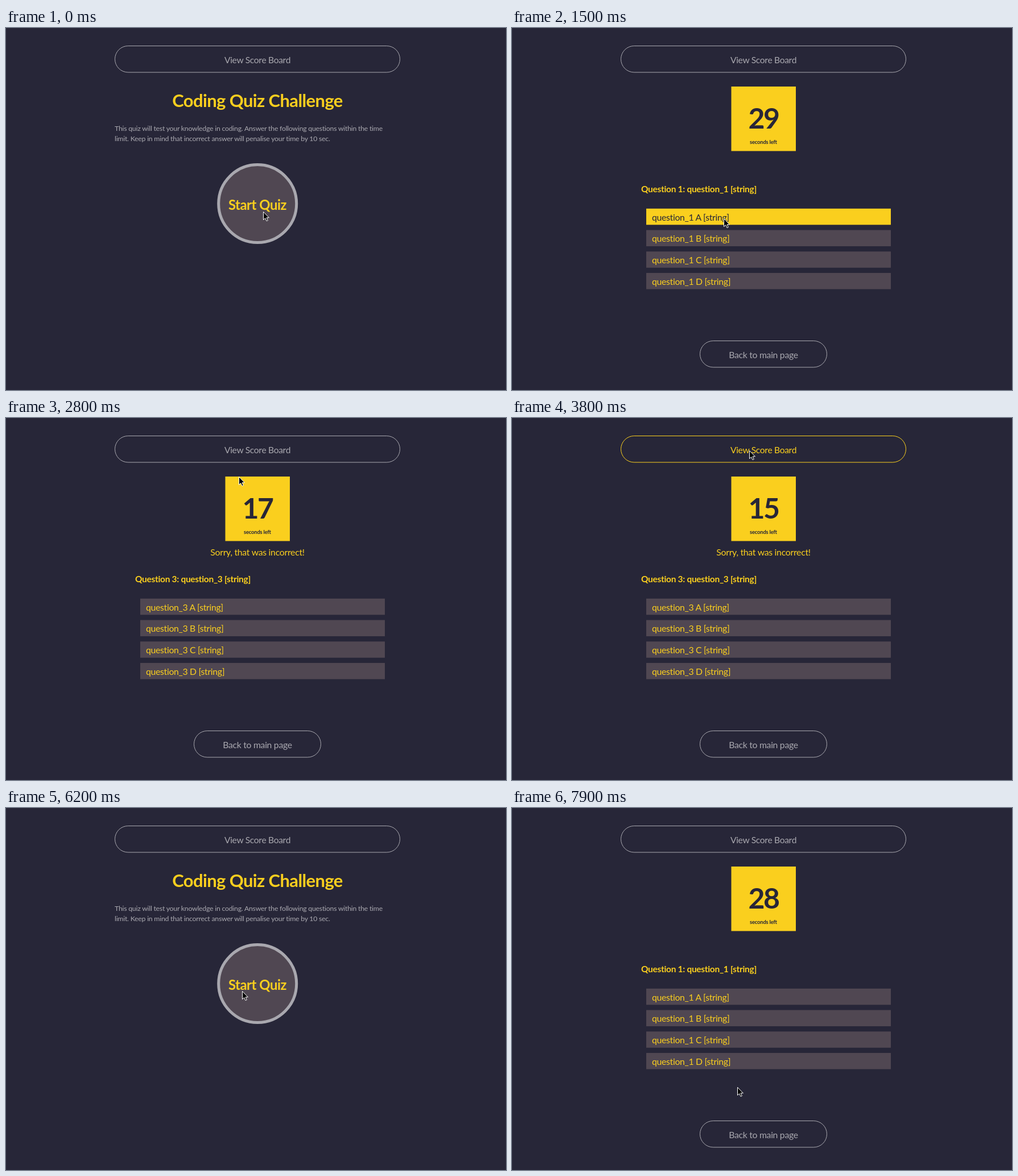
Recreate the animation shown at these times as an HTML page. Size 879 by 637 pixels, loop 8000 ms.

```html
<!DOCTYPE html>
<html lang="en">
<head>
<meta charset="utf-8">
<title>Coding Quiz Challenge</title>
<style>
html, body { margin: 0; width: 100%; height: 100%; overflow: hidden; background: #272638; }
svg { display: block; width: 879px; height: 637px; }
text { font-family: Lato, "Open Sans", sans-serif; letter-spacing: -.02em; white-space: pre; }
.clock text { letter-spacing: -.05em; }
</style>
</head>
<body>
<svg id="stage" viewBox="0 0 879 637"></svg>
<script>
const stage = document.getElementById('stage');
const LOOP = 8000, STEP = 100, TICK = 700;
const DARK = '#272638', GOLD = '#facf1e', GREY = '#a9a8af', PLUM = '#504752';
const MID = 442;

// pointer stops: time, x, y
const path = [
  [0, 452, 323], [400, 452, 323], [1300, 372, 335], [1600, 372, 335],
  [1800, 361, 377], [2200, 361, 377], [2900, 417, 57], [4100, 417, 57],
  [4700, 434, 94], [4900, 434, 94], [5400, 440, 572], [5800, 440, 572],
  [6200, 415, 322], [6300, 415, 322], [6600, 397, 490], [7500, 397, 490],
  [7700, 396, 491], [LOOP, 396, 491]
];

function pointer(t) {
  const i = Math.max(1, path.findIndex(p => p[0] >= t));
  const [t0, x0, y0] = path[i - 1], [t1, x1, y1] = path[i];
  const k = Math.max(0, (t - t0) / (t1 - t0));
  return [Math.round(x0 + (x1 - x0) * k), Math.round(y0 + (y1 - y0) * k)];
}

const rect = (x, y, w, h, fill, more = '') =>
  `<rect x="${x}" y="${y}" width="${w}" height="${h}" fill="${fill}" ${more}/>`;

const text = (s, x, y, size, fill, weight = 400, anchor = 'start') =>
  `<text x="${x}" y="${y}" font-size="${size}" fill="${fill}" font-weight="${weight}" text-anchor="${anchor}">${s}</text>`;

const centred = (s, y, size, fill, weight) => text(s, MID, y, size, fill, weight, 'middle');

const inside = ([px, py], x, y, w, h) => px >= x && px <= x + w && py >= y && py <= y + h;

function pill(label, x, y, w, size, mouse) {
  const color = inside(mouse, x, y, w, 46.5) ? GOLD : GREY;
  return rect(x, y, w, 46.5, 'none', `rx="23.25" stroke="${color}"`) +
    centred(label, y + 30.2, size, color);
}

const scoreButton = mouse => pill('View Score Board', 191.5, 31.5, 501, 15.6, mouse);
const backButton = mouse => pill('Back to main page', 330.5, 550.5, 223, 15.8, mouse);

function home(mouse) {
  return scoreButton(mouse) +
    centred('Coding Quiz Challenge', 138.5, 31, GOLD, 700) +
    text('This quiz will test your knowledge in coding. Answer the following questions within the time', 191, 181, 12.3, GREY) +
    text('limit. Keep in mind that incorrect answer will penalise your time by 10 sec.', 191, 199, 12.3, GREY) +
    `<circle cx="442.2" cy="309.1" r="68.5" fill="${PLUM}" stroke="${GREY}" stroke-width="5"/>` +
    centred('Start Quiz', 319.5, 23.9, GOLD, 700);
}

function quiz(mouse, seconds, n, message, live) {
  let out = scoreButton(mouse) + rect(385.5, 103, 113.5, 113.5, GOLD) +
    `<g class="clock">${centred(seconds, 177, 50, DARK, 700)}</g>` +
    centred('seconds left', 204, 9.4, DARK, 700) +
    centred(message, 242, 15.9, GOLD) +
    text(`Question ${n}: question_${n} [string]`, 227, 288.5, 15.5, GOLD, 700);
  [...'ABCD'].forEach((letter, i) => {
    const y = 317.8 + i * 37.75;
    const over = live && inside(mouse, 236, y, 430, 28.5);
    out += rect(236, y, 430, 28.5, over ? GOLD : PLUM) +
      text(`question_${n} ${letter} [string]`, 246, y + 20.8, 15.8, over ? DARK : GOLD);
  });
  return out + backButton(mouse);
}

function scores(mouse) {
  const rows = ['KV - Score: 6 Pts', 'Toren - Score: 3 Pts', 'Whoever - Score: -5 Pts'];
  return centred('Highest Scores', 102.5, 32.2, GOLD) +
    rect(263, 120, 358, 1, GREY) +
    rows.map((s, i) => text(`#${i + 1}: ${s}`, 267.5, 157 + i * 38, 23.5, GREY)).join('') +
    backButton(mouse);
}

function cursor([x, y], beam) {
  const bar = 'M-3-9Q0-9 0-6Q0-9 3-9M0-6V6M-3 9Q0 9 0 6Q0 9 3 9M-2 3H2';
  const shape = beam
    ? `<path d="${bar}" fill="none" stroke="#fff" stroke-width="2.6"/><path d="${bar}" fill="none" stroke="#111"/>`
    : '<path d="M.5.5V14.5L3.7 11.6L6 16.6L8.3 15.6L6.1 10.8H10.4Z" fill="#000" stroke="#fff"/>';
  return `<g transform="translate(${x} ${y})">${shape}</g>`;
}

function draw(t) {
  // hover follows the pointer one step late
  const mouse = pointer(t), hover = pointer(Math.max(0, t - STEP));
  const onScores = t >= 4000 && t < 5800;
  let view;
  if (t < 300 || (t >= 5800 && t < 6300)) view = home(hover);
  else if (onScores) view = scores(hover);
  else {
    const second = t >= 6300;
    const ticks = Math.floor((t - (second ? 6300 : 300)) / TICK);
    const penalty = !second && t >= 2400 ? 10 : 0;
    const n = second || t < 1600 ? 1 : t < 2000 ? 2 : 3;
    view = quiz(hover, 30 - ticks - penalty, n,
      n === 3 ? 'Sorry, that was incorrect!' : '', t < 2000 || t >= 2300);
  }
  stage.innerHTML = view + cursor(mouse, onScores && inside(mouse, 263, 76, 358, 40));
}

let last = -1;
function frame(now) {
  const t = Math.floor(now % LOOP / STEP) * STEP;
  if (t !== last) draw(last = t);
  requestAnimationFrame(frame);
}
draw(0);
requestAnimationFrame(frame);
</script>
</body>
</html>
```
